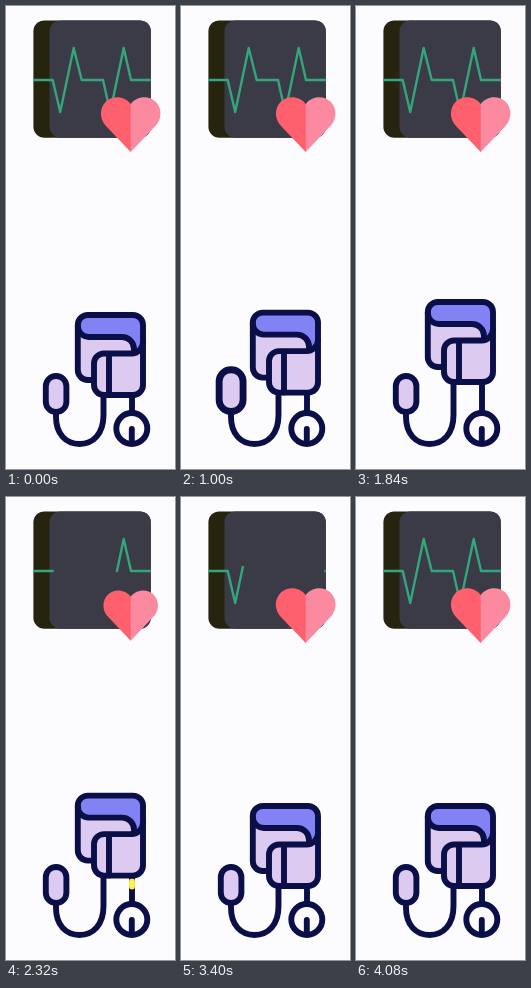
Recreate the animation shown at these times as an HTML page. Size 169 by 463 pixels, loop 5 s.

```html
<!DOCTYPE html>
<html lang="en">
<head>
<meta charset="utf-8">
<title>Blood pressure check</title>
<style>
html, body { margin: 0; width: 100%; height: 100%; overflow: hidden; background: #fcfcff; }
svg { display: block; width: 169px; height: 463px; }
.ink { fill: none; stroke: #0b0f47; stroke-width: 5.9; stroke-linejoin: round; stroke-linecap: round; }
.lilac { fill: #dccaf1; }
.paper { fill: #fcfcff; }
.pulse { fill: none; stroke: #fff04a; stroke-width: 5.9; stroke-linecap: round; }
</style>
</head>
<body>
<svg viewBox="0 0 169 463">
  <!-- heart monitor -->
  <rect x="27.4" y="14.4" width="117.4" height="117.3" rx="11" fill="#26240f"/>
  <rect x="43.5" y="14.4" width="101.3" height="117.3" rx="11" fill="#3b3b47"/>
  <g fill="none" stroke="#34a67c" stroke-width="2.4" stroke-linejoin="round">
    <path id="traceA"/>
    <path id="traceB"/>
  </g>
  <g id="heart">
    <path fill="#ff606d" d="M125 98H124.7C119 90 107 89 100 95.5C93 102.5 93.5 113 100 120L124.7 146H125Z"/>
    <path fill="#fb8aa0" d="M124.7 98C130.4 90 142.4 89 149.4 95.5C156.4 102.5 155.9 113 149.4 120L124.7 146Z"/>
  </g>

  <!-- pressure gauge -->
  <path id="tube" class="ink" d="M50 406V411C50 428 60 438 73.5 438S97.5 428 97.5 409V376"/>
  <path id="tubePulse" class="pulse" d="M50 406V411C50 428 60 438 73.5 438S97.5 428 97.5 409V376"/>
  <path class="ink" d="M126 370V406"/>
  <path id="dialPulse" class="pulse" d="M126 370V406"/>
  <circle class="ink paper" cx="125.8" cy="422.5" r="15.5"/>
  <path id="needle" class="ink" d="M125.8 423V437"/>

  <rect id="bulb" class="ink lilac" x="39.8" y="370" width="20.6" height="36" rx="10.2"/>

  <g id="cuff">
    <path fill="#8282f5" d="M71.8 319a10 10 0 0 1 10-10H127a10 10 0 0 1 10 10V348H71.8Z"/>
    <path class="lilac" d="M71.8 320a11 11 0 0 0 11 11H116a12 12 0 0 1 12 12V374H81.8a10 10 0 0 1-10-10Z"/>
    <path class="ink" d="M88 374H81.8a10 10 0 0 1-10-10V319a10 10 0 0 1 10-10H127a10 10 0 0 1 10 10V336"/>
    <path class="ink" d="M71.8 320a11 11 0 0 0 11 11H116a12 12 0 0 1 12 12V346"/>
    <path class="ink lilac" d="M137 336a11.5 11.5 0 0 1-11.5 11.5H98a10 10 0 0 0-10 10V379a10 10 0 0 0 10 10H127a10 10 0 0 0 10-10Z"/>
    <path class="ink" d="M103 348V389"/>
  </g>
</svg>
<script>
const LOOP = 5000, MONITOR_START = 1840, MONITOR_TIME = 2240, BEAT = 560;
const $ = id => document.getElementById(id);
const clamp = u => Math.min(1, Math.max(0, u));
const ease = u => { u = clamp(u); return u * u * (3 - 2 * u); };
const span = (t, from, to) => ease((t - from) / (to - from));

// Eased value between [time, value] keys
function track(t, keys) {
  let value = keys[0][1];
  for (let i = 1; i < keys.length; i++) {
    value += (keys[i][1] - keys[i - 1][1]) * span(t, keys[i - 1][0], keys[i][0]);
  }
  return value;
}

const BULB = [[200, 1], [450, 1.17], [700, 1], [780, 1], [1200, 1.3], [1640, 1]];
const CUFF = [[860, 0], [1240, -7.8], [1640, -7.8], [1840, -13], [2160, -13], [2720, 0]];
const NEEDLE = [[2360, 0], [2800, 90], [2880, 90], [3320, 0]];
const HEART = [[0, 1], [0.5, 1.29], [0.567, 1.29], [0.9, 0.9], [1, 1]];

const TRACE = "M27.4 74H46.7L54.2 106L67.7 42L75.7 74H97L104.2 106L117.7 42L125 74H144.8";
const traces = [$("traceA"), $("traceB")];
traces.forEach(p => p.setAttribute("d", TRACE));
const traceLen = traces[0].getTotalLength();
const tubeLen = $("tube").getTotalLength();

function showPart(path, from, to) {
  const visible = to > from;
  path.style.display = visible ? "" : "none";
  if (!visible) return;
  path.setAttribute("stroke-dasharray", `${to - from} 9999`);
  path.setAttribute("stroke-dashoffset", -from);
}

function showPulse(path, length, size, u) {
  const head = u * (length + size);
  const active = u > 0 && u < 1;
  showPart(path, active ? Math.max(0, head - size) : 0, active ? Math.min(length, head) : 0);
}

function scaleAt(el, x, y, s) {
  el.setAttribute("transform", `translate(${x} ${y}) scale(${s}) translate(${-x} ${-y})`);
}

function drawMonitor(t) {
  const m = t - MONITOR_START;
  const active = m > 0 && m < MONITOR_TIME;
  scaleAt($("heart"), 124.7, 118.5, active ? track(m % BEAT / BEAT, HEART) : 1);

  // The visible stretch runs on past the right edge and re-enters at the left
  const tail = active ? Math.min(1.995, span(m, 0, 728) + span(m, 674, 1398)) : 0;
  const head = active ? 1 + span(m, 370, 1094) + span(m, 1309, 2033) : 1;
  const lap = Math.floor(tail);
  showPart(traces[0], (tail - lap) * traceLen, Math.min(1, head - lap) * traceLen);
  showPart(traces[1], 0, Math.min(1, head - lap - 1) * traceLen);
}

function drawGauge(t) {
  scaleAt($("bulb"), 50.1, 408.8, track(t, BULB));
  $("cuff").setAttribute("transform", `translate(0 ${track(t, CUFF)})`);
  $("needle").setAttribute("transform", `rotate(${track(t, NEEDLE)} 125.8 422.5)`);
  const pump = t < 1100 ? 480 : 1300;
  showPulse($("tubePulse"), tubeLen, 10, (t - pump) / 400);
  showPulse($("dialPulse"), 36, 5, (t - 2240) / 170);
}

function frame() {
  const t = performance.now() % LOOP;
  drawMonitor(t);
  drawGauge(t);
  requestAnimationFrame(frame);
}
frame();
</script>
</body>
</html>
```
